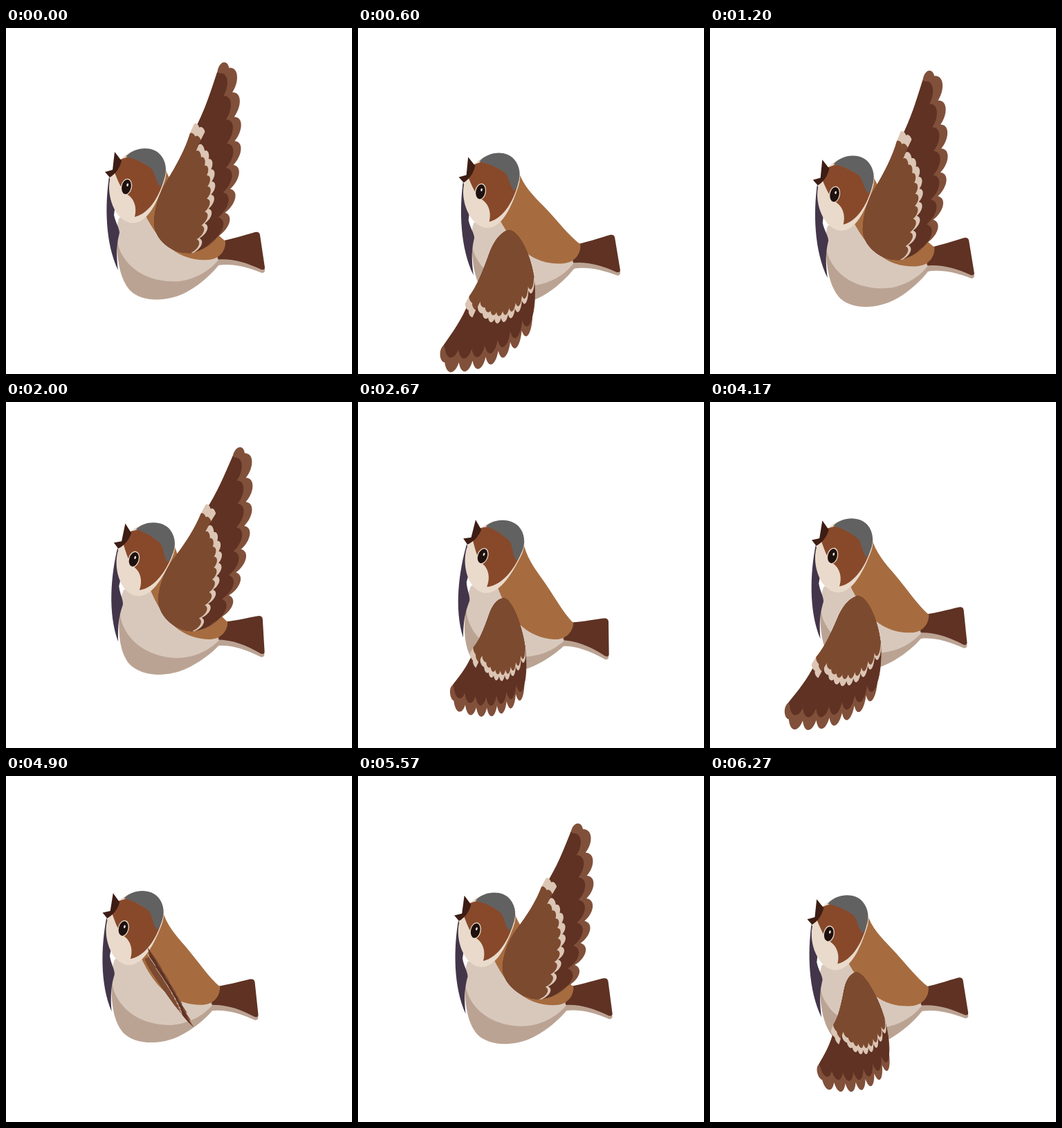
An HTML page for the animation above (6310 ms loop, 500 px wide and 500 px high).

```html
<!DOCTYPE html>
<html lang="en">
<head>
<meta charset="utf-8">
<title>Flying sparrow</title>
<style>
  html, body { margin: 0; width: 100%; height: 100%; overflow: hidden; background: #fff; }
  svg { display: block; width: 100vw; height: 100vh; }
  .dark { fill: #5f3223; }
  .mid { fill: #7c4a2f; }
  .tip { fill: #81503a; }
  .rust { fill: #88492a; }
  .back { fill: #a66c3f; }
  .cream { fill: #e9dacb; }
  .belly { fill: #d8c8bc; }
  .shade { fill: #bba393; }
  .bar { fill: #dcc5b4; }
  .cap { fill: #626161; }
  .bib { fill: #43364a; }
  .beak { fill: #3d1d14; }
</style>
</head>
<body>
<svg viewBox="0 0 500 500">
  <g id="bird">
    <path class="shade" d="M285 332 L320 322 L372 344 Q377 353 370 354 C345 344 325 340 306 343 L285 352Z"/>
    <path class="dark" d="M300 310 C325 306 345 299 360 295 Q366 294 367 299 L374 346 Q374 350 369 349 C345 338 325 332 300 335Z"/>
    <path class="shade" d="M160 300 C160 330 163 362 180 380 C198 397 235 396 262 381 C280 371 297 356 308 342 L300 300Z"/>
    <path class="belly" d="M163 275 C157 295 160 315 168 328 C185 358 220 368 250 366 C275 363 295 350 307 335 L250 270 L200 255Z"/>
    <path class="back" d="M229 200 C236 222 250 236 264 251 C282 270 300 295 317 308 C318 320 310 334 292 335 C255 337 225 318 200 268Z"/>
    <path class="bib" d="M149 215 C143 255 143 310 162 350 C159 325 160 312 164 296 C164 289 158 281 156 270 L160 240Z"/>
    <path class="cream" d="M166 190 C180 173 208 171 221 183 C232 193 234 208 229 222 C220 248 206 282 183 282 C163 281 149 255 149 230 C149 212 158 202 166 190Z"/>
    <path class="rust" d="M165 190 C172 188 176 186 180 185 L230 212 C224 240 208 268 186 273 C190 258 184 246 176 241 C168 236 163 224 157 209Z"/>
    <path class="cap" d="M173 186 C186 171 212 170 223 183 C232 193 233 208 228 219 C227 224 225 227 223 229 C216 222 216 210 210 203 C201 196 188 189 173 186Z"/>
    <path class="beak" d="M157 179 L167 192 C164 203 159 210 150 216 L143 208 L154 205Z"/>
    <g transform="translate(174 229.500) rotate(12)">
      <ellipse class="cream" rx="8" ry="12"/>
      <ellipse rx="6.700" ry="10.700" fill="#1f110e"/>
      <ellipse cx="1" cy="-3" rx="1.300" ry="2.200" fill="#f3e8de"/>
    </g>
    <g id="wing"></g>
  </g>
</svg>
<script>
  const bird = document.getElementById("bird");
  const wing = document.getElementById("wing");

  // A row of n feather lobes along a cubic curve with control points a, b, c, d
  function lobes(n, a, b, c, d) {
    const at = t => [0, 1].map(i => {
      const s = 1 - t;
      return a[i] * s ** 3 + 3 * b[i] * s * s * t + 3 * c[i] * s * t * t + d[i] * t ** 3;
    });
    let path = `L${a}`;
    for (let i = 0; i < n; i++) {
      const [x, y] = at(i / n), end = at((i + 1) / n);
      const dx = end[0] - x, dy = end[1] - y;
      const ahead = (along, out) => [x + dx * along + dy * out, y + dy * along - dx * out];
      path += `C${ahead(0, 0.4)} ${ahead(0.6, 0.35)} ${end}`;
    }
    return path;
  }

  function add(cls, d) {
    const path = document.createElementNS("http://www.w3.org/2000/svg", "path");
    path.setAttribute("class", cls);
    path.setAttribute("d", d);
    wing.append(path);
  }

  const root = "M232 222 C247 198 260 172 272 148 ";
  const lead = root + "C288 118 296 92 306 62 ";
  const base = "L268 325 C240 328 213 305 214 280 C215 258 222 238 232 222Z";

  add("tip", lead + "C309 45 321 44 323 56"
    + lobes(7, [323, 56], [336, 140], [335, 220], [306, 301]) + "Q295 318 268 325" + base);
  add("dark", lead
    + lobes(7, [309, 64], [325, 140], [324, 225], [297, 309]) + "Q288 320 268 325" + base);
  add("bar", "M266 152" + lobes(2, [272, 138], [277, 141], [283, 145], [288, 149]) + "L282 161Z");
  add("bar", "M270 178" + lobes(9, [279, 168], [308, 188], [302, 262], [270, 325]) + "L260 324Z");
  add("mid", root.replace("272 148", "266 152")
    + lobes(2, [266, 152], [271, 154], [277, 158], [282, 161])
    + lobes(9, [275, 177], [300, 200], [296, 265], [267, 325]) + base);

  // Key poses of the body: frame, dx, dy, tilt in degrees
  const drift = [
    [0, 0, 0, 0], [36, 7, 9.5, -0.9], [60, 5, 6.5, 5.1], [80, -3, 6, 7.7],
    [104, 2, 2, 4.2], [116, 3, -1, 2.8], [147, -7, -5, 2.4], [188, -1.5, -2.5, -0.7]
  ];

  // Cubic Hermite interpolation with slopes taken from the neighbouring keys
  function pose(f) {
    const last = drift.length - 1;
    let i = 0;
    while (i < last - 1 && f >= drift[i + 1][0]) i++;
    const a = drift[i], b = drift[i + 1];
    const p = drift[Math.max(i - 1, 0)], n = drift[Math.min(i + 2, last)];
    const gap = b[0] - a[0], u = (f - a[0]) / gap, v = 1 - u;
    return [1, 2, 3].map(c => {
      const m0 = (b[c] - p[c]) / (b[0] - p[0]) * gap;
      const m1 = (n[c] - a[c]) / (n[0] - a[0]) * gap;
      return a[c] * (1 + 2 * u) * v * v + m0 * u * v * v
        + b[c] * u * u * (3 - 2 * u) - m1 * u * u * v;
    });
  }

  // The wing swings about a hinge along the body: the hinge direction stays, the span direction scales
  const hinge = [0.59, 0.81], span = [0.44, -0.9];
  const det = hinge[0] * span[1] - hinge[1] * span[0];

  function flap(f) {
    const phase = f / 12 * 2 * Math.PI;
    const amp = 1 - 0.045 * Math.min(1, f / 120);
    const k = amp * (0.07 + 0.93 * Math.sin(1.69 * Math.cos(phase)));
    const sweep = 0.123 * Math.max(0, -Math.sin(phase));
    const lift = 0.15 * Math.max(0, -k);
    const h = [hinge[0], hinge[1] - lift];
    const w = [0, 1].map(i => k * span[i] + sweep * hinge[i]);
    const column = (x, y) => [0, 1].map(i =>
      (h[i] * (x * span[1] - y * span[0]) + w[i] * (y * hinge[0] - x * hinge[1])) / det);
    return `translate(213 284) matrix(${column(1, 0)},${column(0, 1)},0,0) translate(-213 -284)`;
  }

  const start = performance.now();

  function draw() {
    const t = (performance.now() - start) % 6310;
    const f = Math.min(188, Math.floor((t + 5) * 0.03));
    const [dx, dy, tilt] = pose(f);
    bird.setAttribute("transform", `translate(${dx} ${dy}) rotate(${tilt} 274 290.5)`);
    wing.setAttribute("transform", flap(f));
    requestAnimationFrame(draw);
  }
  draw();
</script>
</body>
</html>
```
